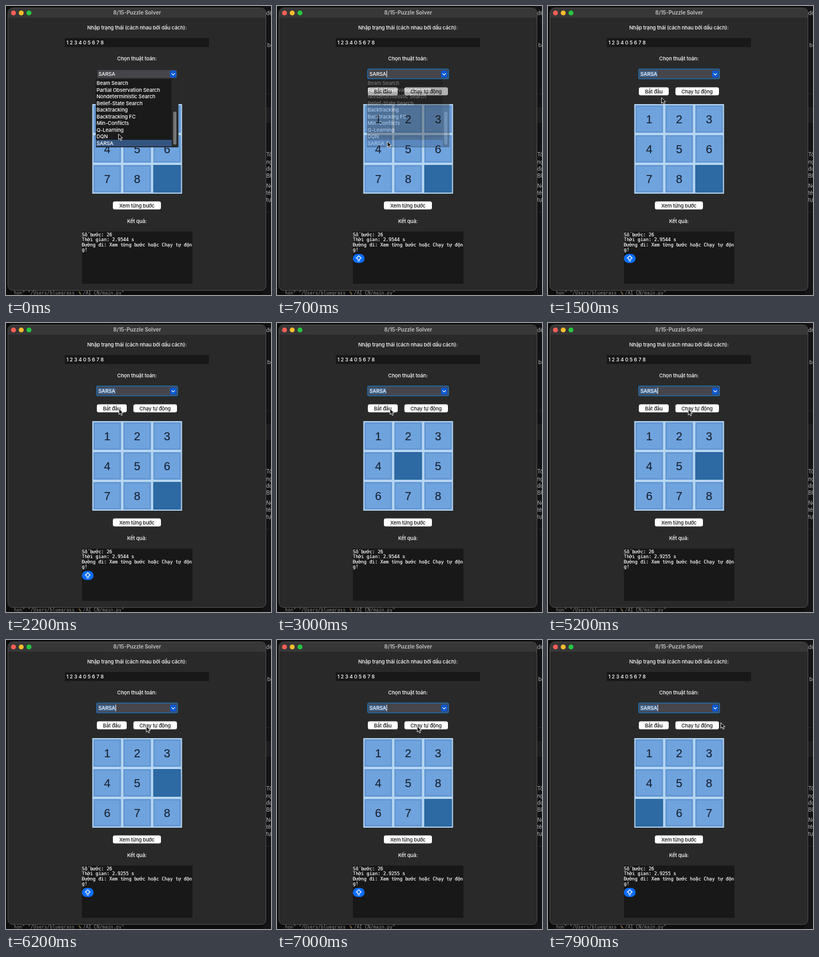
These frames come from a looping animation (496 by 542 pixels, 8000 ms). An HTML page:

```html
<!DOCTYPE html>
<html lang="vi">
<head>
<meta charset="utf-8">
<title>8/15-Puzzle Solver</title>
<style>
html, body { margin: 0; width: 100%; height: 100%; overflow: hidden; background: #0d0d0e; }
svg { display: block; }
text { font: 500 9.5px Inter, sans-serif; letter-spacing: -.1px; fill: #fff; white-space: pre; }
.mid { text-anchor: middle; }
.title { font-size: 9.7px; font-weight: 700; fill: #b9b9b9; letter-spacing: 0; }
.mono text { font: 8.57px "DejaVu Sans Mono", monospace; letter-spacing: 0; stroke: #fff; stroke-width: .2px; }
.side text { font-size: 10px; font-weight: 400; fill: #b4b4b6; }
.dim text { fill: #8e8e90; stroke: none; }
.btn rect { fill: #fff; }
.btn text { font-size: 9.3px; fill: #0c0c0c; text-anchor: middle; }
.tile text { font: 21.5px "Liberation Sans", Arial, sans-serif; fill: #1b2433; text-anchor: middle; letter-spacing: 0; stroke: #1b2433; stroke-width: .2px; }

/* One loop is 8 s, so 1.25% is 100 ms. */
.a { animation: 8s step-end infinite; }
#pointer { animation-name: pointer; }
#menu { animation-name: menu; }
#ring { animation-name: ring; }
#mark { animation-name: mark; }
#caret { animation-name: caret; }
#caps { animation-name: caps; }
#old { animation-name: old; }
#new { animation-name: new; }
#t0 { animation-name: t0; }
#t5 { animation-name: t5; }
#t6 { animation-name: t6; }
#t7 { animation-name: t7; }
#t8 { animation-name: t8; }

@keyframes pointer {
  0% { transform: translate(210px, 240px); }
  1.25% { transform: translate(209px, 243px); }
  2.5% { transform: translate(207px, 248px); }
  3.75% { transform: translate(206px, 252px); }
  5% { transform: translate(206px, 254px); }
  13.75% { transform: translate(203px, 249px); }
  15% { transform: translate(196px, 235px); }
  16.25% { transform: translate(199px, 211px); }
  17.5% { transform: translate(210px, 186px); }
  18.75% { transform: translate(212px, 172px); }
  20% { transform: translate(213px, 166px); }
  21.25% { transform: translate(212px, 163px); }
  23.75% { transform: translate(211px, 161px); }
  47.5% { transform: translate(214px, 160px); }
  48.75% { transform: translate(224px, 157px); }
  50% { transform: translate(238px, 156px); }
  51.25% { transform: translate(251px, 158px); }
  52.5% { transform: translate(259px, 161px); }
  53.75% { transform: translate(262px, 162px); }
  97.5% { transform: translate(301px, 158px); }
  98.75%, 100% { transform: translate(323px, 155px); }
}
@keyframes menu { 0% { opacity: 1; } 8.75% { opacity: .36; } 10% { opacity: .1; } 11.25%, 100% { opacity: 0; } }
@keyframes ring { 0% { opacity: 0; } 8.75%, 100% { opacity: 1; } }
@keyframes mark { 0% { opacity: 0; } 10%, 100% { opacity: 1; } }
@keyframes caret {
  0%, 16.25%, 27.5%, 72.5%, 83.75%, 95% { opacity: 0; }
  8.75%, 20%, 65%, 76.25%, 87.5%, 98.75%, 100% { opacity: 1; }
}
@keyframes caps { 0%, 28.75% { opacity: 0; } 2.5%, 71.25%, 100% { opacity: 1; } }
@keyframes old { 0% { opacity: 1; } 65%, 100% { opacity: 0; } }
@keyframes new { 0% { opacity: 0; } 65%, 100% { opacity: 1; } }
@keyframes t0 {
  0%, 83.75% { transform: translate(112px, 112px); }
  28.75% { transform: translate(56px, 56px); }
  65% { transform: translate(112px, 56px); }
  90% { transform: translate(56px, 112px); }
  97.5%, 100% { transform: translate(0, 112px); }
}
@keyframes t5 { 0%, 65%, 100% { transform: translate(56px, 56px); } 28.75% { transform: translate(112px, 56px); } }
@keyframes t6 {
  0% { transform: translate(112px, 56px); }
  28.75% { transform: translate(0, 112px); }
  97.5%, 100% { transform: translate(56px, 112px); }
}
@keyframes t7 {
  0% { transform: translate(0, 112px); }
  28.75% { transform: translate(56px, 112px); }
  90%, 100% { transform: translate(112px, 112px); }
}
@keyframes t8 {
  0% { transform: translate(56px, 112px); }
  28.75% { transform: translate(112px, 112px); }
  83.75%, 100% { transform: translate(112px, 56px); }
}
</style>
</head>
<body>
<svg width="496" height="542" viewBox="0 0 496 542">
  <defs>
    <g id="face">
      <rect x="163.5" y="186" width="52" height="52" fill="#6fa3de"/>
      <rect x="165.5" y="188" width="48" height="48" fill="none" stroke="#5081b8" stroke-width=".8"/>
    </g>
  </defs>

  <!-- desktop behind the window -->
  <rect width="496" height="542" fill="#0d0d0e"/>
  <rect x="480" width="16" height="542" fill="#131315"/>
  <rect x="480" y="190" width="16" height="29" fill="#1c1c1e"/>
  <path d="M480 164.5h16M480 386.5h16" stroke="#242426"/>
  <g class="side">
    <text x="487" y="17">đế</text>
    <text x="489" y="77">bạ</text>
    <text x="487" y="282">Tố</text>
    <text x="487" y="296">ng</text>
    <text x="487" y="309">đọ</text>
    <text x="487" y="322">BF</text>
    <text x="487" y="341">Nế</text>
    <text x="487" y="354">tê</text>
    <text x="487" y="367">tự</text>
  </g>
  <g class="mono dim">
    <text x="15" y="541">hon" "/Users/bluegrass</text>
    <text x="144" y="541">/AI CN/main.py"</text>
    <path d="M135.500 535q3 0 4 3l2 3h-3q-2-3-3-6z" fill="#6b5a38"/>
  </g>

  <!-- window -->
  <rect x="3.5" y="3.5" width="483" height="530" rx="9" fill="#292929" stroke="#525252"/>
  <path d="M4 22V13q0-9 9-9h464q9 0 9 9v9z" fill="#373738"/>
  <circle cx="14" cy="13" r="4.6" fill="#ff5f57"/>
  <circle cx="28.5" cy="13" r="4.6" fill="#febc2e"/>
  <circle cx="43" cy="13" r="4.6" fill="#28c840"/>
  <text class="mid title" x="245.5" y="16">8/15-Puzzle Solver</text>

  <text class="mid" x="245" y="43.5">Nhập trạng thái (cách nhau bởi dấu cách):</text>
  <rect x="110" y="60" width="270" height="17" fill="#181818"/>
  <text x="113" y="72">1 2 3 4 0 5 6 7 8</text>
  <text class="mid" x="245" y="102">Chọn thuật toán:</text>

  <!-- combo box -->
  <rect x="171" y="120" width="149" height="15" rx="2" fill="#46454b"/>
  <rect id="ring" class="a" x="169.8" y="118.300" width="151.200" height="18.200" rx="2.500" fill="#46454b" stroke="#1f70b5" stroke-width="1.600"/>
  <rect id="mark" class="a" x="172" y="121.5" width="33" height="12" fill="#3f628c"/>
  <text x="173" y="131">SARSA</text>
  <rect id="caret" class="a" x="205" y="121.5" width="1" height="12" fill="#fff"/>
  <rect x="307" y="121" width="12" height="13.5" rx="3" fill="#0b58d0"/>
  <path d="M310.2 126.6l2.800 2.800 2.800-2.800" fill="none" stroke="#fff" stroke-width="1.3" stroke-linecap="round"/>

  <g class="btn">
    <rect x="170" y="152.5" width="56" height="15" rx="3.5"/>
    <text x="198" y="163.5">Bắt đầu</text>
    <rect x="238.5" y="152.5" width="81.5" height="15" rx="3.5"/>
    <text x="279" y="163.5">Chạy tự động</text>
    <rect x="200" y="366.5" width="90" height="15" rx="3.5"/>
    <text x="245" y="377.5">Xem từng bước</text>
  </g>

  <!-- board -->
  <rect x="161.5" y="184" width="168" height="168" fill="#b9d7f1"/>
  <g class="tile"><use href="#face"/><text x="189.5" y="220">1</text></g>
  <g class="tile" transform="translate(56)"><use href="#face"/><text x="189.5" y="220">2</text></g>
  <g class="tile" transform="translate(112)"><use href="#face"/><text x="189.5" y="220">3</text></g>
  <g class="tile" transform="translate(0 56)"><use href="#face"/><text x="189.5" y="220">4</text></g>
  <g class="tile a" id="t5"><use href="#face"/><text x="189.5" y="220">5</text></g>
  <g class="tile a" id="t6"><use href="#face"/><text x="189.5" y="220">6</text></g>
  <g class="tile a" id="t7"><use href="#face"/><text x="189.5" y="220">7</text></g>
  <g class="tile a" id="t8"><use href="#face"/><text x="189.5" y="220">8</text></g>
  <g class="a" id="t0">
    <rect x="163.5" y="186" width="52" height="52" fill="#2d6aa4"/>
    <rect x="165.5" y="188" width="48" height="48" fill="none" stroke="#2a6299" stroke-width=".8"/>
  </g>

  <!-- result -->
  <text class="mid" x="245" y="406.5">Kết quả:</text>
  <rect x="142" y="423" width="207" height="98" fill="#181818"/>
  <g class="mono">
    <text x="142" y="431.5">Số bước: 26</text>
    <text id="old" class="a" x="142" y="441">Thời gian: 2.9544 s</text>
    <text id="new" class="a" x="142" y="441">Thời gian: 2.9255 s</text>
    <text x="142" y="450.7">Đường đi: Xem từng bước hoặc Chạy tự độn</text>
    <text x="142" y="460.3">g!</text>
  </g>
  <g id="caps" class="a">
    <rect x="142" y="465" width="22" height="17" rx="8.5" fill="#0a6dfb"/>
    <path d="M153 468.3l4.8 4.7h-2.6v2.6h-4.4V473h-2.6zM150.8 478.2h4.4" fill="none" stroke="#fff" stroke-width="1.2" stroke-linejoin="round"/>
  </g>

  <!-- list of algorithms -->
  <g id="menu" class="a">
    <rect x="168" y="137" width="154.5" height="128" fill="#1a1a1b"/>
    <rect x="310" y="137" width="12.5" height="127" fill="#29292a"/>
    <rect x="313" y="198" width="6" height="62" rx="3" fill="#757576"/>
    <rect x="168" y="251" width="142" height="12.5" fill="#345580"/>
    <text x="169.5" y="148">Beam Search</text>
    <text x="169.5" y="160.5">Partial Observation Search</text>
    <text x="169.5" y="173">Nondeterministic Search</text>
    <text x="169.5" y="185.5">Belief-State Search</text>
    <text x="169.5" y="198">Backtracking</text>
    <text x="169.5" y="210.5">Backtracking FC</text>
    <text x="169.5" y="223">Min-Conflicts</text>
    <text x="169.5" y="235.5">Q-Learning</text>
    <text x="169.5" y="248">DQN</text>
    <text x="169.5" y="260.5">SARSA</text>
  </g>

  <path id="pointer" class="a" d="M.5 0v10.6l2.5-2.3 1.8 4 1.9-.8-1.8-3.9h3.4z" fill="#0a0a0a" stroke="#fff" stroke-width=".9" stroke-linejoin="round"/>
</svg>
</body>
</html>
```
